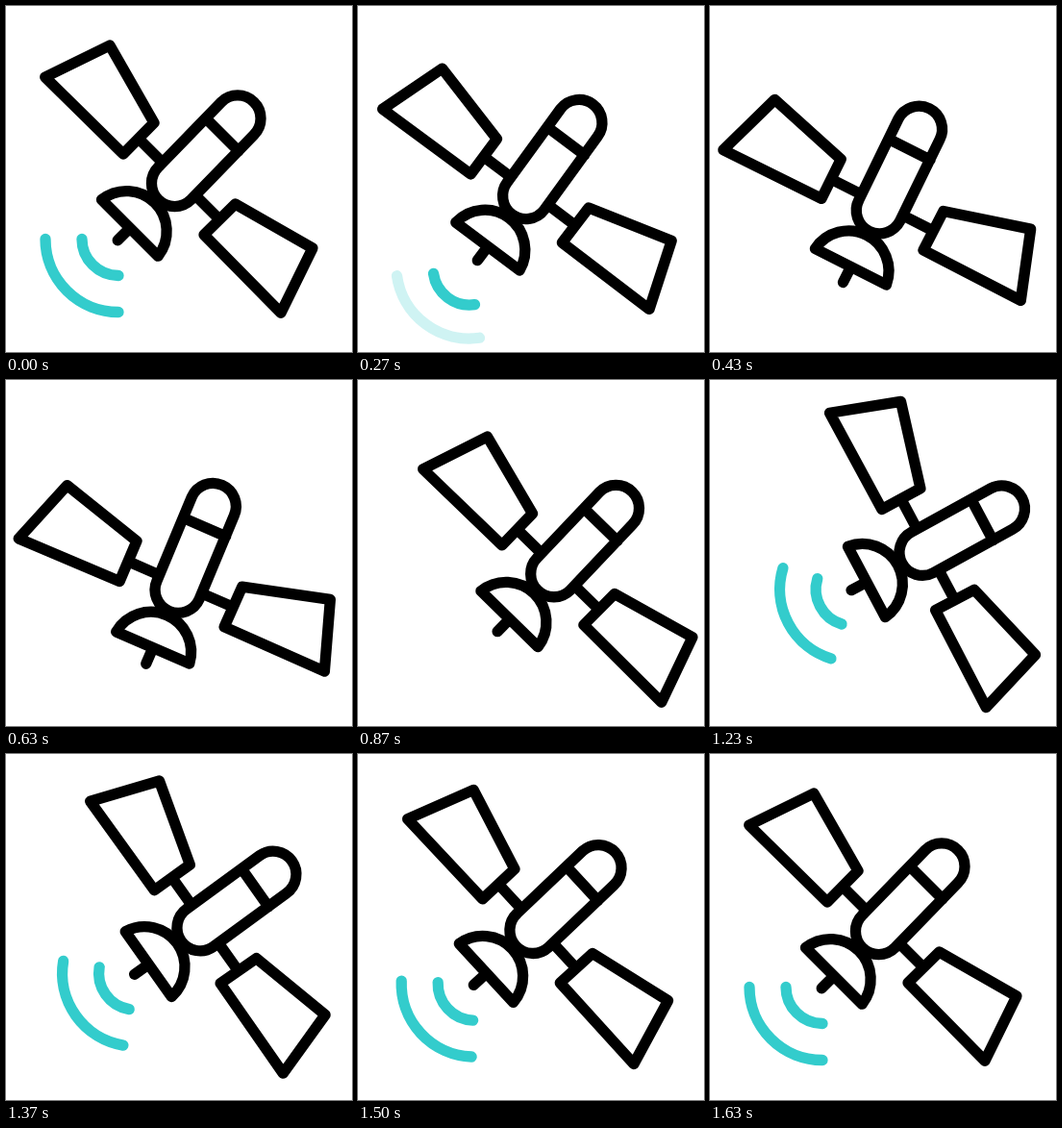
An HTML page that plays this animation: 360 by 360 pixels, repeating every 1.67 s.

```html
<!DOCTYPE html>
<html lang="en">
<head>
<meta charset="utf-8">
<title>Satellite</title>
<style>
  html, body { margin: 0; height: 100%; overflow: hidden; background: #fff; }
  svg { display: block; width: 100%; height: 100%; }
</style>
</head>
<body>
<svg viewBox="0 0 360 360" fill="none" stroke="#000" stroke-width="11.3" stroke-linecap="round" stroke-linejoin="round">
  <g id="satellite">
    <g id="waves" transform="translate(117 242.5)" stroke="#33cccc">
      <path/>
      <path/>
    </g>
    <path id="panel" d="M40.7 74 108 41 154 121.5 122 154ZM138 138 162 162"/>
    <use href="#panel" transform="matrix(0 -1 -1 0 360 360)"/>
    <path d="M158.5 167.5 224 100A24 24 0 0 1 258 134L192.5 201.5A24 24 0 0 1 158.5 167.5ZM209 118 242 151"/>
    <path d="M99.5 201.5A41.8 41.8 0 0 1 158.2 260.2ZM129 231 116.2 243.8"/>
  </g>
</svg>
<script>
const LOOP = 1670, STEPS = 50;
const satellite = document.getElementById('satellite');
const [innerWave, outerWave] = document.querySelectorAll('#waves path');

// Each leg: start and end step, start and end angle, then start, control and end offset.
const legs = [
  { span: [1.5, 17.5], angle: [0, -22.5], x: [0, -3.5, 0.4], y: [0, 17.8, 33] },
  { span: [17.5, 34], angle: [-22.5, 19.3], x: [0.4, 27.5, 52.5], y: [33, 21.3, -3.6] },
  { span: [34, 48], angle: [19.3, 0], x: [52.5, 28.1, 0], y: [-3.6, -4, 0] }
];

const clamp = v => Math.min(1, Math.max(0, v));
const ramp = (v, from, to) => clamp((v - from) / (to - from));
const ease = (v, from, to) => {
  const u = ramp(v, from, to);
  return u * u * (3 - 2 * u);
};
const mix = (a, b, u) => a + (b - a) * u;
const curve = ([a, b, c], u) => mix(mix(a, b, u), mix(b, c, u), u);

// A quarter ring that grows about a pivot and drifts down to the left.
function drawWave(path, radius, pivot, grow, [left, down], fade) {
  const r = radius * grow;
  const offset = pivot * (1 - grow) * Math.SQRT1_2;
  const x = -offset - left, y = offset + down;
  path.setAttribute('d', `M${x - r} ${y}A${r} ${r} 0 0 0 ${x} ${y + r}`);
  path.setAttribute('opacity', clamp(1.43 * grow) * (1 - fade));
}

function draw(step) {
  const leg = legs.find(l => step < l.span[1]) || legs[2];
  const u = ease(step, ...leg.span);
  const x = curve(leg.x, u), y = curve(leg.y, u);
  satellite.setAttribute('transform',
    `translate(${x} ${y}) rotate(${mix(...leg.angle, u)} 180 180)`);

  // The waves drift away and fade early in the loop, then grow back from the antenna.
  const leaving = step < 20;
  const drift = leaving ? ease(step, 0, 13) : 0;
  drawWave(innerWave, 38, 0, leaving ? 1 : ease(step, 27, 36.5),
    [15 * drift, 12.5 * drift], leaving ? ramp(step, 8, 12) : 0);
  drawWave(outerWave, 76, 16, leaving ? 1 : ease(step, 28, 37.5),
    [15 * drift, 8 * drift], leaving ? ramp(step, 5, 8.9) : 0);
}

function tick() {
  const time = performance.now() % LOOP;
  draw(Math.floor(time / LOOP * STEPS + 0.25) % STEPS);
  requestAnimationFrame(tick);
}
tick();
</script>
</body>
</html>
```
